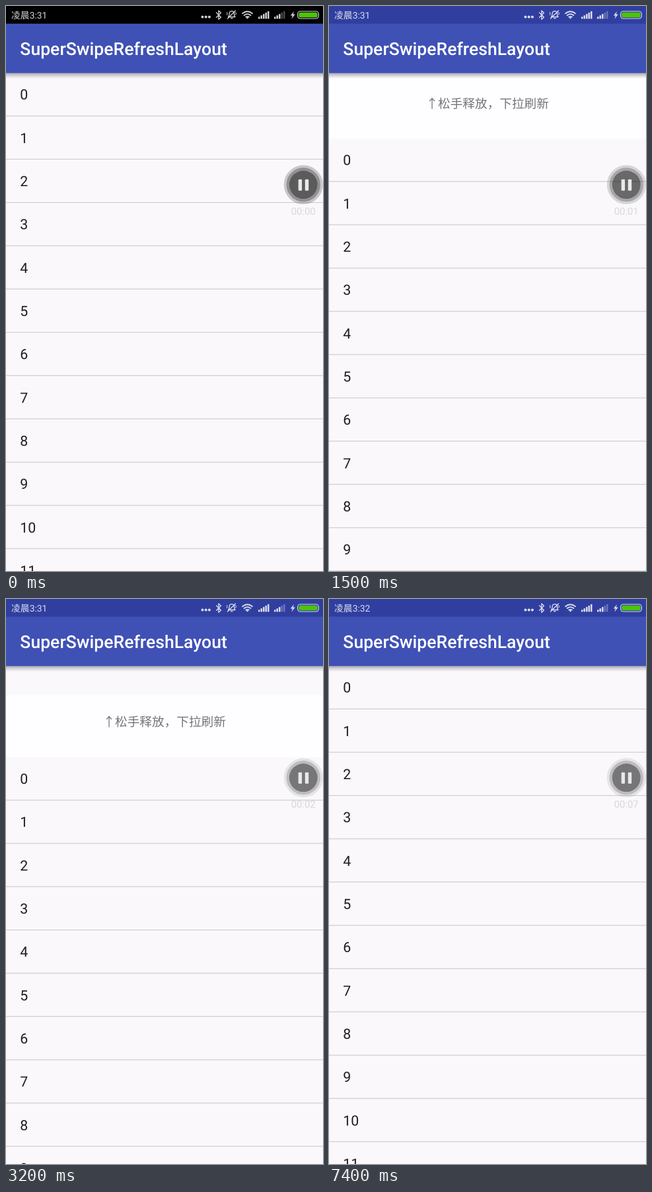
These frames come from a looping animation (480 px wide and 853 px high, 8000 ms). An HTML page:

```html
<!DOCTYPE html>
<html lang="zh-CN">
<head>
<meta charset="utf-8">
<title>SuperSwipeRefreshLayout</title>
<style>
  html, body { margin: 0; width: 100%; height: 100%; overflow: hidden; background: #faf8fb; }
  svg { display: block; width: 480px; height: 853px; text-rendering: geometricPrecision; }
  text { font-family: Roboto, "Noto Sans CJK SC", "Noto Sans CJK", sans-serif; }
  .title { font-size: 26.58px; font-weight: 500; fill: #fff; }
  .row { font-size: 21.33px; fill: #1f1d20; }
  .line { fill: #d3d1d5; }
  .hint { font-family: "Noto Sans CJK SC", "Noto Sans CJK", sans-serif; font-size: 18.67px; fill: #757477; }
  .clock { font-size: 13.85px; }
  .count { font-size: 14.9px; fill: #d9d7da; text-anchor: middle; }
  .mid { text-anchor: middle; }
  .stroke { fill: none; stroke: #fff; stroke-linecap: round; stroke-linejoin: round; }
</style>
</head>
<body>
<svg viewBox="0 0 480 853">
  <defs>
    <linearGradient id="shade" x2="0" y2="1">
      <stop offset="0" stop-color="#000" stop-opacity=".32"/>
      <stop offset=".45" stop-color="#000" stop-opacity=".15"/>
      <stop offset="1" stop-color="#000" stop-opacity="0"/>
    </linearGradient>
  </defs>
  <rect width="480" height="853" fill="#faf8fb"/>

  <g id="pull">
    <rect y="8" width="480" height="93.33" fill="#fefdff"/>
    <g id="more" class="hint">
      <text class="mid" x="201" y="54.7">↓</text><text x="210" y="54.7">继续下拉</text>
    </g>
    <g id="release" class="hint">
      <text class="mid" x="156" y="54.7">↑</text><text x="165" y="54.7">松手释放，下拉刷新</text>
    </g>
    <text id="busy" class="hint mid" x="240" y="54.7">刷新中</text>
    <g id="list"></g>
  </g>

  <rect y="101.2" width="480" height="8.5" fill="url(#shade)"/>
  <rect y="26" width="480" height="75.33" fill="#3f51b5"/>
  <text class="title" x="21.33" y="74.3">SuperSwipeRefreshLayout</text>

  <rect id="bar" width="480" height="26.67"/>
  <g fill="#fff" opacity=".82">
    <text id="clock" class="clock" x="8" y="19"></text>
    <circle cx="297.5" cy="16.6" r="2"/><circle cx="302.7" cy="16.6" r="2"/><circle cx="307.9" cy="16.6" r="2"/>
    <path class="stroke" stroke-width="1.3" d="M318.5 10l7 7-3.6 3.2V7l3.6 3.2-7 7"/>
    <g class="stroke" stroke-width="1.3">
      <path d="M336.5 16.5h10.5q-1.6-1.5-1.6-5t-3.6-3.8q-3.6 .3-3.6 3.8t-1.7 5M340.5 18.6h2.6M335.5 19L347.5 7"/>
      <path stroke-width="1" d="M334.8 9.5v4M346.6 9.8q2-.5 2 1.6t-1.6 1.6"/>
    </g>
    <g class="stroke" stroke-width="1.8">
      <path d="M358 11.2q7.5-6 15 0M360.6 14q4.9-3.8 9.8 0M363.2 16.6q2.3-1.6 4.6 0"/>
    </g>
    <circle cx="365.5" cy="18" r="1.3"/>
    <g id="signal"></g>
    <path d="M436 8l-5.2 6.4h3l-1.4 5 5.4-6.8h-3.2z"/>
  </g>
  <rect x="441.7" y="8" width="31.6" height="11" rx="4" fill="none" stroke="#d8dbe8" stroke-width="1.2"/>
  <rect x="443.4" y="9.7" width="28.2" height="7.6" rx="2.6" fill="#4bc40a"/>

  <g id="button">
    <circle cx="450.3" cy="269.8" r="27.6" fill="none" stroke="#000" stroke-width="3.8"/>
    <circle cx="450.3" cy="269.8" r="23.6" fill="none" stroke="#000" stroke-width="4.2"/>
    <circle cx="450.3" cy="269.8" r="21.5"/>
  </g>
  <g fill="#e9e7ea">
    <rect x="442.7" y="261.7" width="5.4" height="17" rx="1"/>
    <rect x="452.8" y="261.7" width="5.4" height="17" rx="1"/>
  </g>
  <text id="count" class="count" x="450.2" y="315.2"></text>
</svg>

<script>
const $ = id => document.getElementById(id);
const LOOP = 8000, STEP = 100;
const REST = 93.33;                       // height of the pull header
const RELEASE = 3950, DONE = 7150, SETTLE = 250;
const ROW = 65.333, TOP = 101.33;
const TICKS = [1200, 2200, 3300, 4200, 5200, 6200, 7200];

$('list').innerHTML = Array.from({ length: 13 }, (_, i) => {
  const y = TOP + i * ROW;
  return `<text class="row" x="21.33" y="${y + 40.1}">${i}</text>` +
    `<rect class="line" y="${y + 64}" width="480" height="1.33"/>`;
}).join('');

const bars = (x, lit) => Array.from({ length: 5 }, (_, i) => {
  const h = 3 + i * 2.1;
  return `<rect x="${x + i * 3.5}" y="${19.3 - h}" width="2.5" height="${h}" opacity="${i < lit ? 1 : .35}"/>`;
}).join('');
$('signal').innerHTML = bars(382, 5) + bars(406, 3);

const clamp = x => Math.min(1, Math.max(0, x));
const mix = (a, b, k) => a + (b - a) * k;
const easeOut = x => 1 - (1 - clamp(x)) ** 2;

// The drag meets growing resistance, then the header settles and closes.
const drag = t => 155 * (1 - Math.exp(-Math.max(0, t - 25) / 1450));
function offset(t) {
  if (t < RELEASE) return drag(t);
  if (t < DONE) return mix(drag(RELEASE), REST, easeOut((t - RELEASE) / SETTLE));
  return mix(REST, 0, easeOut((t - DONE) / SETTLE));
}

const rings = [...$('button').children];
const strong = [.2, .42, .63], faint = [.085, .245, .525];
const show = (id, on) => $(id).setAttribute('visibility', on ? 'visible' : 'hidden');

function draw(t) {
  const d = offset(t);
  const busy = t >= RELEASE + SETTLE;
  $('pull').setAttribute('transform', `translate(0 ${d.toFixed(2)})`);
  show('busy', busy);
  show('more', !busy && d < REST);
  show('release', !busy && d >= REST);
  $('bar').setAttribute('fill', t < 100 ? '#000' : '#303f9f');
  $('clock').textContent = t < 4000 ? '凌晨3:31' : '凌晨3:32';
  $('count').textContent = '00:0' + TICKS.filter(s => t >= s).length;
  const fade = clamp((t - 1300) / 400);
  rings.forEach((r, i) => r.setAttribute('opacity', mix(strong[i], faint[i], fade)));
}

const start = performance.now();
function frame() {
  const t = (performance.now() - start) % LOOP;
  draw(Math.floor((t + 2) / STEP) * STEP % LOOP);
  requestAnimationFrame(frame);
}
frame();
</script>
</body>
</html>
```
